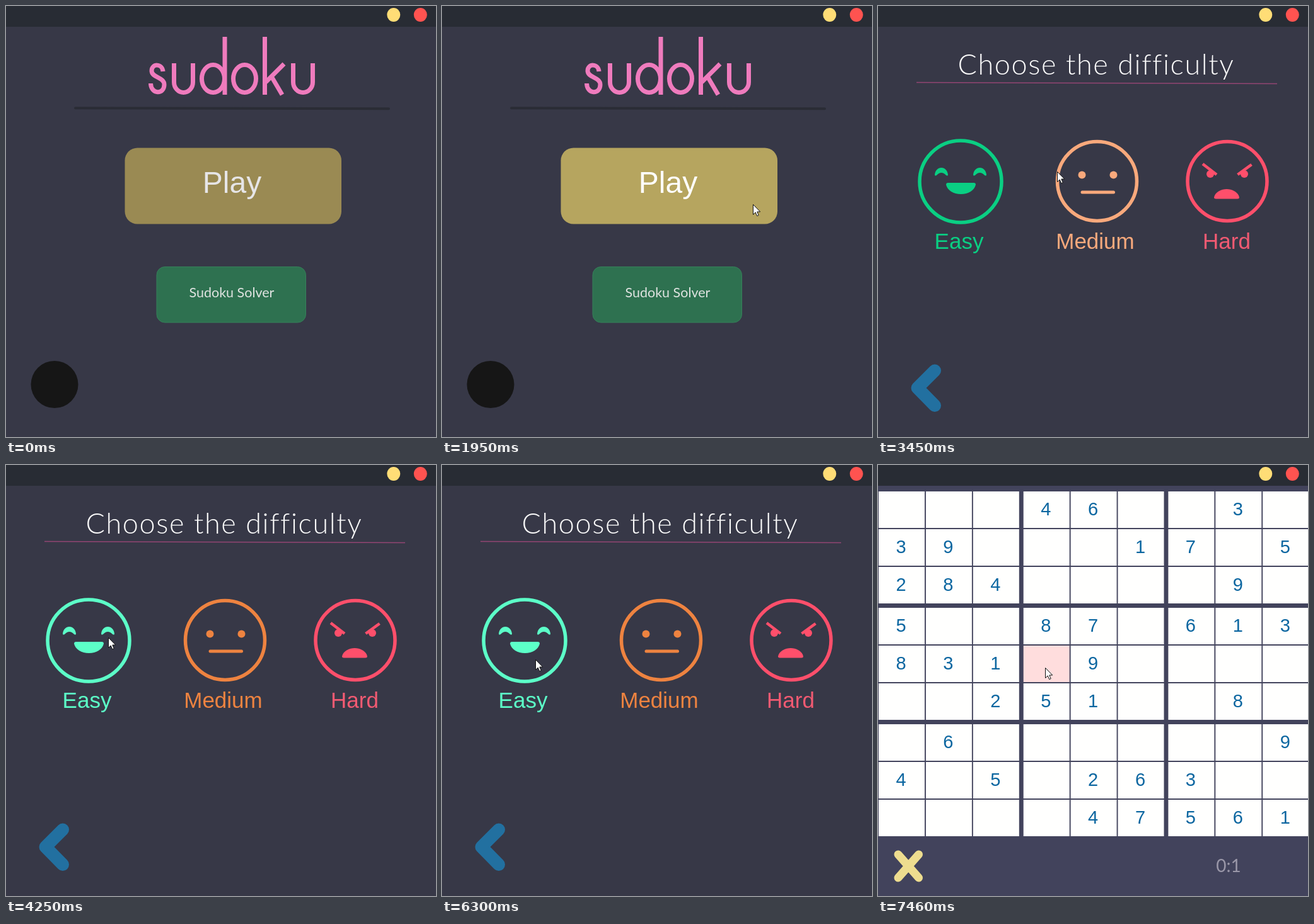
These frames come from a looping animation (682 by 685 pixels, 8 s). An HTML page:

```html
<!DOCTYPE html>
<html lang="en">
<head>
<meta charset="utf-8">
<title>Sudoku</title>
<style>
  html, body { margin: 0; width: 100%; height: 100%; overflow: hidden; background: #373847; }
  svg { display: block; }
  text { font-family: "Liberation Sans", Arial, sans-serif; text-anchor: middle; }
  .lato { font-family: Lato, sans-serif; }
  .line { fill: none; stroke: currentColor; }
  .round { stroke-linecap: round; stroke-linejoin: round; }
  .face { fill: currentColor; }
  .face text { font-size: 35px; }
  #play { color: #9a8a53; }
  #play text { font-size: 48px; fill: #e6e5e7; }
  #play.on { color: #b6a55f; }
  #play.on text { fill: #fff; }
  #easy { color: #0acf83; }
  #easy.on { color: #5cffc8; }
  #easy.pressed g { color: #0acf83; }
  #medium { color: #ee8340; }
  #medium.on { color: #f9a97c; }
  #hard { color: #ff4f6b; }
  #back { color: #2270a0; }
  #back.on { color: #3498db; }
  #cells rect { fill: #fffffe; }
  #cells rect.on { fill: #ffdddd; }
  #cells text { font-size: 29px; fill: #0b66a0; }
</style>
</head>
<body>
<svg width="682" height="685" viewBox="0 0 682 685">
  <rect id="backdrop" width="682" height="685"/>
  <rect width="682" height="33" fill="#282c34"/>
  <ellipse cx="614.8" cy="14" rx="10.5" ry="11" fill="#ffdd76"/>
  <ellipse cx="657.3" cy="14" rx="10.5" ry="11" fill="#ff5350"/>

  <g id="menu">
    <g class="line" color="#ef7bbd" stroke-width="7" role="img" aria-label="sudoku">
      <path d="M249 104C248 91 231 91 231 103C231 114 251 113 251 125C251 141 230 141 229.500 123"/>
      <path d="M266.500 91V121a15 16.500 0 0 0 30 0V91M455.500 91V121a15.500 16.500 0 0 0 31 0V91"/>
      <path d="M347 49V141M410.500 49V141M441 92L412 121M421 112L438 141"/>
      <ellipse cx="328.500" cy="115.500" rx="18" ry="22"/>
      <ellipse cx="378.500" cy="115.500" rx="18" ry="22"/>
    </g>
    <path d="M110 162.300L607 163.300" stroke="#2a2c35" stroke-width="4" stroke-linecap="round"/>
    <g id="play">
      <rect x="188.500" y="225.500" width="343.500" height="121" rx="20" fill="currentColor"/>
      <text x="358.500" y="297">Play</text>
    </g>
    <rect x="239" y="414.500" width="236.500" height="88.500" rx="13" fill="#2e7150" stroke="#36805a"/>
    <text class="lato" x="358" y="463" font-size="21.500" fill="#dfe3e0">Sudoku Solver</text>
    <circle cx="77" cy="601.500" r="37.500" fill="#161616"/>
  </g>

  <g id="levels">
    <text class="lato" x="346" y="109" font-size="45" font-weight="300" letter-spacing="1.600" fill="#fafafa">Choose the difficulty</text>
    <path d="M61 121.500L633 123.500" stroke="#934573" stroke-width="1.500"/>
    <g id="easy" class="face">
      <g color="inherit">
        <circle class="line" cx="131" cy="279" r="65" stroke-width="5.500"/>
        <path id="eye" fill="currentColor" d="M90 268C91 261 95 257 100.500 257S110 261 111 268Q111 271 108 269Q100.500 261 93 269Q90 271 90 268z"/>
        <use href="#eye" x="61"/>
        <path fill="currentColor" d="M108 284Q108 281 111 281H152Q155 281 155 284C153 293 143 299 131.500 299S110 293 108 284z"/>
      </g>
      <text x="128.500" y="386">Easy</text>
    </g>
    <g id="medium" class="face">
      <circle class="line" cx="347.500" cy="278.500" r="63" stroke-width="5.500"/>
      <circle cx="323.500" cy="268.500" r="6"/>
      <circle cx="373.500" cy="268.500" r="6"/>
      <path class="line round" d="M324 296H373.500" stroke-width="5"/>
      <text x="344.500" y="386">Medium</text>
    </g>
    <g id="hard" class="face">
      <circle class="line" cx="554" cy="278.500" r="63" stroke-width="5.500"/>
      <circle cx="527" cy="267" r="6"/>
      <circle cx="581" cy="267" r="6"/>
      <path class="line" d="M515 251L537 268M592.500 252L570.500 268" stroke-width="4.500"/>
      <path d="M533 304C535 295 545 291 553 291S571 295 573 304Q573 306.500 570 306.500H536Q533 306.500 533 304z"/>
      <text x="553" y="386" fill="#f25a72">Hard</text>
    </g>
    <path id="back" class="line round" d="M90 579.500L62.500 607L90 635" stroke-width="20"/>
  </g>

  <g id="game">
    <g id="cells"></g>
    <path class="line round" color="#eedd8f" d="M32 619L64.500 656M64.500 619L32 656" stroke-width="13"/>
    <text id="timer" class="lato" x="556" y="647" font-size="28" fill="#9a97a8"></text>
  </g>

  <path id="cursor" d="M.5 .5V16.500L4.200 13L6.700 18.700L9.200 17.600L6.800 12H11.700z" fill="#fff" stroke="#111"/>
</svg>
<script>
const LOOP = 8000, STEP = 79, FIRST_MOVE = 840;
const $ = id => document.getElementById(id);

const puzzle = ["000460030", "390001705", "284000090",
                "500870613", "831090000", "002510080",
                "060000009", "405026300", "000047561"];

// time, x, y of the pointer's tip
const path = [
  [760, 650, 700], [840, 645, 672], [1000, 604, 630], [1160, 556, 590],
  [1320, 545, 508], [1470, 523, 430], [1630, 510, 386], [1710, 507, 360],
  [1790, 503, 338], [1950, 493, 314], [2430, 406, 268],
  [3050, 406, 268], [3450, 283, 263], [3930, 207, 272], [4250, 160, 274],
  [4560, 160, 274], [4640, 155, 300], [4800, 145, 425], [4950, 124, 615], [5030, 88, 638],
  [5110, 88, 638], [5190, 105, 622], [5350, 142, 485], [5590, 150, 360],
  [5760, 150, 314], [5840, 150, 314], [5920, 148, 309],
  [6765, 148, 309], [7460, 265, 322]
];

function pointerAt(time) {
  // the pointer is sampled in short steps
  const t = FIRST_MOVE + STEP * Math.floor((time - FIRST_MOVE) / STEP + .25);
  const next = path.findIndex(key => key[0] > t);
  if (next === 0) return path[0].slice(1);
  if (next < 0) return path.at(-1).slice(1);
  const [t0, x0, y0] = path[next - 1], [t1, x1, y1] = path[next];
  const p = (t - t0) / (t1 - t0);
  return [x0 + (x1 - x0) * p, y0 + (y1 - y0) * p];
}

function add(tag, attributes, content = "") {
  const node = document.createElementNS("http://www.w3.org/2000/svg", tag);
  for (const name in attributes) node.setAttribute(name, attributes[name]);
  node.textContent = content;
  return $("cells").appendChild(node);
}

const cells = [];
puzzle.forEach((row, r) => [...row].forEach((digit, c) => {
  const x = 1 + 74.9 * c + 5 * Math.floor(c / 3);
  const y = 42 + 60 * r + 5 * Math.floor(r / 3);
  const node = add("rect", { x, y, width: 73, height: 58 });
  cells.push({ node, x, y });
  if (digit > 0) add("text", { x: x + 35.5, y: y + 38 }, digit);
}));

function draw(t) {
  const [x, y] = pointerAt(t);
  const over = (left, top, right, bottom) => x >= left && x <= right && y >= top && y <= bottom;
  const light = (node, on) => node.classList.toggle("on", on);
  const show = (id, on) => $(id).setAttribute("display", on ? "inline" : "none");

  show("menu", t < 2590);
  show("levels", t >= 2590 && t < 6450);
  show("game", t >= 6530);
  $("backdrop").setAttribute("fill", t < 6450 ? "#373847" : "#42435c");

  light($("play"), over(188, 225, 532, 346));
  light($("easy"), over(63, 211, 198, 347));
  light($("medium"), t >= 2670 && over(281, 213, 413, 343));
  light($("back"), over(52, 569, 100, 645));
  $("easy").classList.toggle("pressed", t >= 6220 && t < 6300);

  for (const cell of cells)
    light(cell.node, over(cell.x, cell.y, cell.x + 73, cell.y + 58));
  $("timer").textContent = t < 7460 ? "0:0" : "0:1";
  $("cursor").setAttribute("transform", `translate(${Math.round(x)} ${Math.round(y)})`);
}

const start = performance.now();
function frame() {
  draw((performance.now() - start) % LOOP);
  requestAnimationFrame(frame);
}
frame();
</script>
</body>
</html>
```
